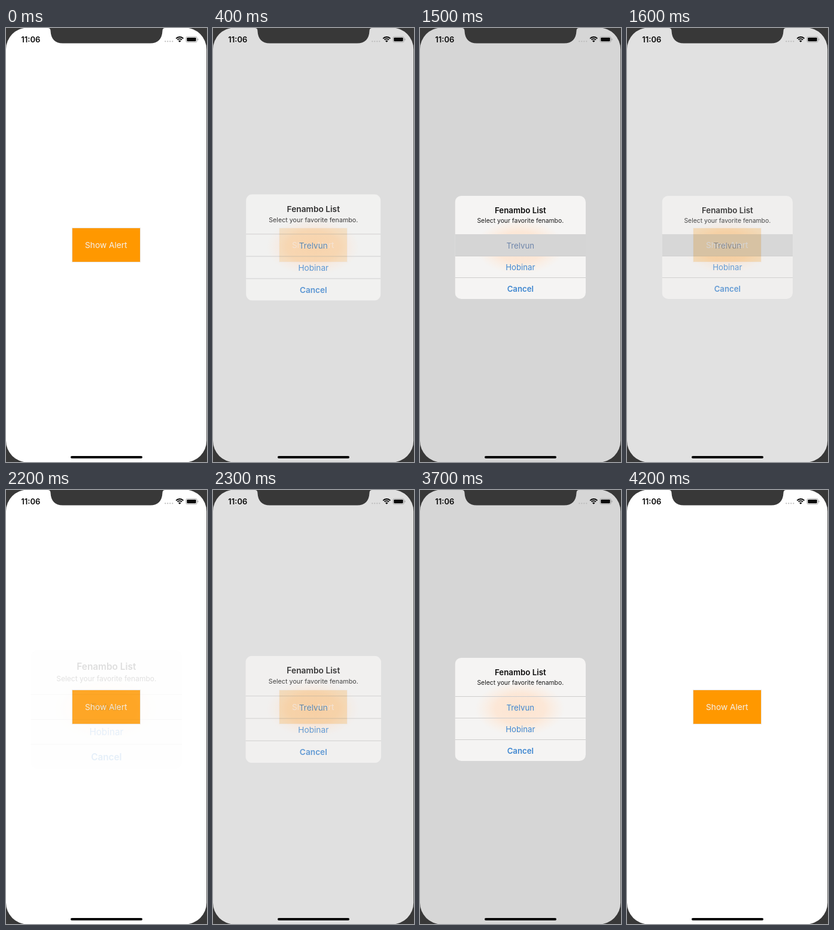
An HTML page with a canvas that plays this animation: 336 px wide and 724 px high, repeating every 4.4 s.

```html
<!DOCTYPE html>
<html lang="en">
<head>
<meta charset="utf-8">
<title>Alert demo</title>
<style>
  html, body { margin: 0; width: 100%; height: 100%; overflow: hidden; background: #383838; }
  canvas { display: block; width: 336px; height: 724px; }
</style>
</head>
<body>
<canvas id="stage"></canvas>
<script>
const W = 336, H = 724, LOOP = 4400, STEP = 100;
const OMEGA = 0.02285; // critically damped spring, per ms
const CENTER = { x: 167.8, y: 366 };
const BOX = { x: 58.5, y: 280, w: 218.5, h: 172 };
const ROWS = [
  { top: 344.5, label: "Trelvun", weight: 400 },
  { top: 380.5, label: "Hobinar", weight: 400 },
  { top: 416.5, label: "Cancel", weight: 600 }
];
// Each visit: spring start, first shown, row pressed, which row, fade start, gone
const VISITS = [
  { open: 260, shown: 400, press: 1400, row: 0, close: 1560, gone: 1800 },
  { open: 2172, shown: 2200, press: 3800, row: 2, close: 3960, gone: 4200 }
];

const dpr = window.devicePixelRatio || 1;
const stage = document.getElementById("stage");
const sheet = document.createElement("canvas");
for (const c of [stage, sheet]) {
  c.width = Math.round(W * dpr);
  c.height = Math.round(H * dpr);
}
const ctx = stage.getContext("2d");
const layer = sheet.getContext("2d");

const spring = ms => ms <= 0 ? 0 : 1 - (1 + OMEGA * ms) * Math.exp(-OMEGA * ms);

function roundBox(g, x, y, w, h, r) {
  g.beginPath();
  g.roundRect(x, y, w, h, r);
}

function text(g, str, x, y, size, weight, color, align = "center") {
  g.font = `${weight} ${size}px Inter, "Open Sans", sans-serif`;
  g.textAlign = align;
  g.textBaseline = "alphabetic";
  g.fillStyle = color;
  g.fillText(str, x, y);
}

function pose(t) {
  const v = VISITS.find(v => t >= v.shown && t < v.gone);
  if (!v) return null;
  const enter = spring(t - v.open);
  const alpha = enter * (1 - spring(t - v.close));
  return {
    alpha,
    scale: 1.18 - 0.18 * enter,
    dim: Math.max(0, (alpha - 0.13) / 0.87),
    pressed: t >= v.press ? v.row : -1
  };
}

function buttonAlpha(t) {
  if (t < 2000 || t >= 2300) return 1;
  return t < 2100 ? 0.7 : t < 2200 ? 0.8 : 0.95;
}

function drawButton(alpha) {
  ctx.save();
  ctx.globalAlpha = alpha;
  ctx.fillStyle = "#e9e5e0";
  ctx.fillRect(110, 333, 115, 58);
  ctx.fillStyle = "#ff9800";
  ctx.fillRect(111, 334, 113, 56);
  text(ctx, "Show Alert", 167.3, 367, 13.7, 400, "#f4f1ec");
  ctx.restore();
}

function drawGlow(g) {
  g.save();
  g.translate(167, 365);
  g.scale(75, 46);
  const glow = g.createRadialGradient(0, 0, 0, 0, 0, 1);
  glow.addColorStop(0, "rgba(253,228,208,1)");
  glow.addColorStop(0.55, "rgba(253,230,212,0.9)");
  glow.addColorStop(1, "rgba(253,236,222,0)");
  g.fillStyle = glow;
  g.fillRect(-1, -1, 2, 2);
  g.restore();
}

function drawAlert(p) {
  const g = layer;
  g.setTransform(1, 0, 0, 1, 0, 0);
  g.clearRect(0, 0, sheet.width, sheet.height);
  g.save();
  g.scale(dpr, dpr);
  g.translate(CENTER.x, CENTER.y);
  g.scale(p.scale, p.scale);
  g.translate(-CENTER.x, -CENTER.y);

  roundBox(g, BOX.x, BOX.y, BOX.w, BOX.h, 10.5);
  g.clip();
  g.fillStyle = "#f5f4f3";
  g.fillRect(BOX.x, BOX.y, BOX.w, BOX.h);
  drawGlow(g);

  text(g, "Fenambo List", CENTER.x, 308.5, 13.3, 600, "#0c0c0c");
  text(g, "Select your fenambo.".replace("your", "your favorite"), CENTER.x, 325, 10.4, 400, "#1c1c1c");

  g.fillStyle = "#cecdcd";
  for (const row of ROWS) g.fillRect(BOX.x, row.top - 0.5, BOX.w, 1);
  ROWS.forEach((row, i) => {
    const down = i === p.pressed;
    if (down) {
      g.fillStyle = "#d5d5d5";
      g.fillRect(BOX.x, row.top - 0.5, BOX.w, 36);
    }
    text(g, row.label, CENTER.x, row.top + 23, 13.2, row.weight, down ? "#6f86ab" : "#3f87d0");
  });
  g.restore();

  ctx.save();
  ctx.globalAlpha = p.alpha;
  ctx.drawImage(sheet, 0, 0, W, H);
  ctx.restore();
}

function drawStatus() {
  text(ctx, "11:06", 25.3, 23.8, 13, 600, "#080808", "left");

  ctx.fillStyle = "#b9b9b9";
  for (let i = 0; i < 4; i++) {
    ctx.beginPath();
    ctx.arc(266.3 + i * 4, 22.3, 1.1, 0, Math.PI * 2);
    ctx.fill();
  }

  // wifi
  ctx.strokeStyle = ctx.fillStyle = "#080808";
  ctx.lineWidth = 1.8;
  for (const r of [5.2, 8.3]) {
    ctx.beginPath();
    ctx.arc(290.3, 23.3, r, -Math.PI * 0.76, -Math.PI * 0.24);
    ctx.stroke();
  }
  ctx.beginPath();
  ctx.moveTo(290.3, 23.8);
  ctx.arc(290.3, 23.8, 3.2, -Math.PI * 0.76, -Math.PI * 0.24);
  ctx.fill();

  // battery
  ctx.strokeStyle = "#a5a5a5";
  ctx.lineWidth = 0.9;
  roundBox(ctx, 300.8, 14.4, 18.6, 9.4, 2.7);
  ctx.stroke();
  roundBox(ctx, 302.3, 15.9, 15.4, 6.4, 1.4);
  ctx.fill();
  ctx.fillStyle = "#a5a5a5";
  roundBox(ctx, 320.3, 17.6, 1.2, 3, 0.6);
  ctx.fill();
}

function drawNotch() {
  ctx.fillStyle = "#383838";
  ctx.beginPath();
  ctx.moveTo(70, 0);
  ctx.quadraticCurveTo(74.5, 0, 74.5, 5);
  ctx.bezierCurveTo(75, 18, 82, 25.5, 95, 25.5);
  ctx.lineTo(241, 25.5);
  ctx.bezierCurveTo(254, 25.5, 261, 18, 261.5, 5);
  ctx.quadraticCurveTo(261.5, 0, 266, 0);
  ctx.fill();
}

function draw(t) {
  const p = pose(t);
  ctx.setTransform(dpr, 0, 0, dpr, 0, 0);
  ctx.fillStyle = "#383838";
  ctx.fillRect(0, 0, W, H);

  ctx.save();
  roundBox(ctx, 0, -0.5, 335.2, 725, 36);
  ctx.clip();
  ctx.fillStyle = "#fff";
  ctx.fillRect(0, 0, W, H);
  drawButton(buttonAlpha(t));
  if (p) {
    ctx.fillStyle = `rgba(0,0,0,${0.16 * p.dim})`;
    ctx.fillRect(0, 0, W, H);
    drawAlert(p);
  }
  drawStatus();
  ctx.fillStyle = "#000";
  roundBox(ctx, 108, 714, 120, 4, 2);
  ctx.fill();
  ctx.restore();
  drawNotch();
}

const start = performance.now();
function tick() {
  const t = (performance.now() - start) % LOOP;
  draw(Math.floor(t / STEP) * STEP);
  requestAnimationFrame(tick);
}
tick();
</script>
</body>
</html>
```
